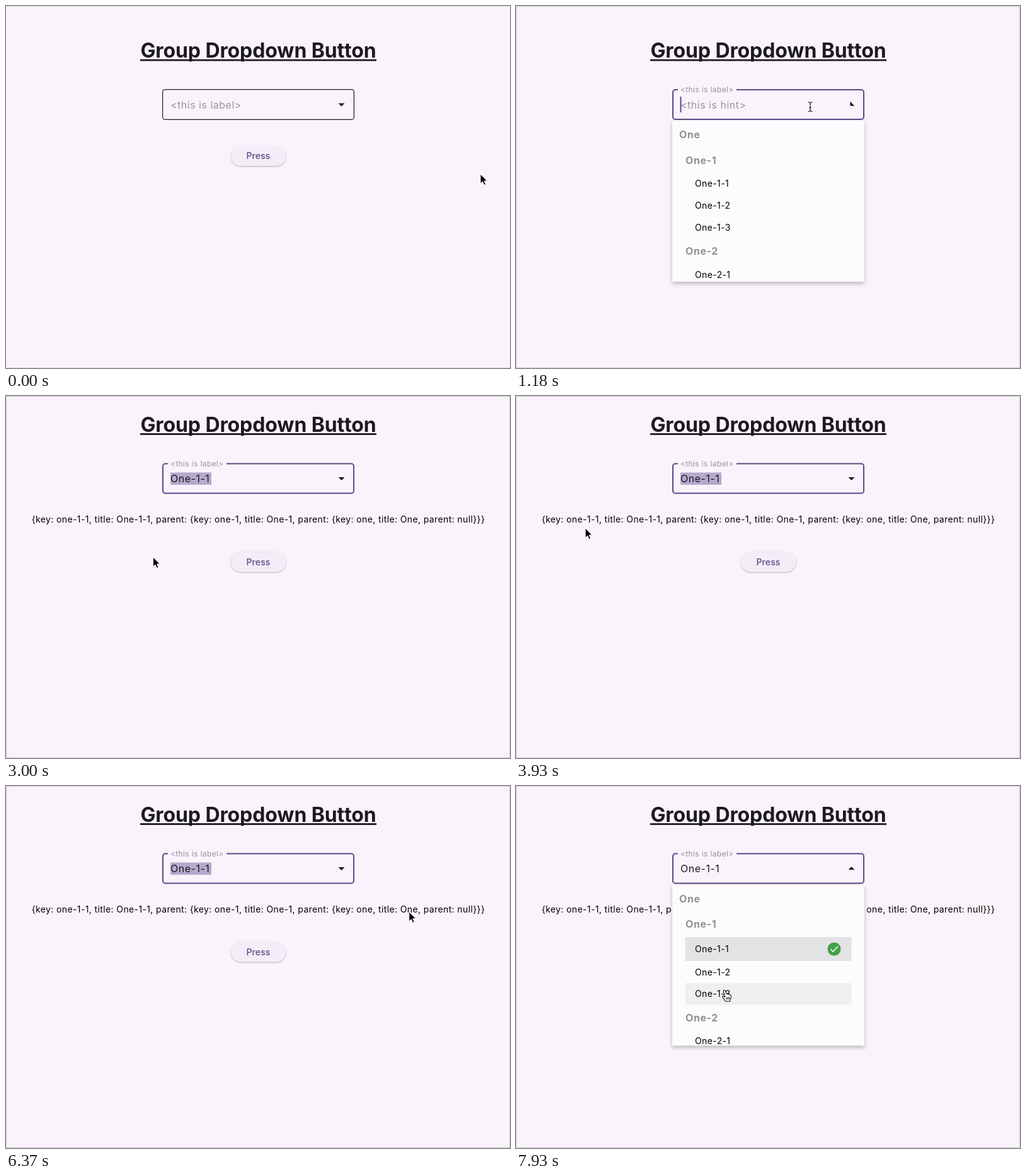
Animation, 800 px wide and 575 px high, one loop 8000 ms. Source, as an HTML page:

```html
<!DOCTYPE html>
<html lang="en">
<head>
<meta charset="utf-8">
<title>Group Dropdown Button</title>
<style>
  html, body { margin: 0; width: 100%; height: 100%; overflow: hidden; background: #faf3fb; }
  svg { display: block; width: 100vw; height: 100vh; }
  text { font-family: Inter, Roboto, sans-serif; white-space: pre; }
  .body { font-size: 16px; letter-spacing: .5px; }
  .small { font-size: 14px; letter-spacing: .38px; }
  .dim { fill: #97929a; }
  .group { font-size: 16px; font-weight: 700; letter-spacing: .6px; fill: #929194; }
  .title { font-size: 32px; font-weight: 700; letter-spacing: -.1px; fill: #1c1a1f; }
  .press { font-size: 14px; font-weight: 500; letter-spacing: .1px; fill: #5b4a86; }
  .button { fill: #f4edf8; filter: drop-shadow(0 1px 1px rgba(0, 0, 0, .28)); }
  .panel { fill: #fdfbfe; filter: drop-shadow(0 3px 3px rgba(0, 0, 0, .26)); }
</style>
</head>
<body>
<svg viewBox="0 0 800 575">
  <defs>
    <clipPath id="panelClip"><rect x="248" y="183" width="305" height="255"/></clipPath>
    <clipPath id="rowClip"><rect x="268.5" y="265" width="264" height="34.5"/></clipPath>
  </defs>
  <rect width="800" height="575" fill="#faf3fb"/>
  <path id="edgeIdle" d="M0 .5H800M0 574.5H800" stroke="#e0dae1"/>
  <rect id="edgeActive" x=".5" y=".5" width="799" height="574" fill="none" stroke="#cec9cf"/>

  <g id="head">
    <text class="title" x="400.5" y="82" text-anchor="middle">Group Dropdown Button</text>
    <rect x="213" y="84.6" width="375" height="2.8" fill="#1c1a1f"/>
    <rect id="idleBorder" x="248.6" y="132.6" width="303.8" height="47.8" rx="4" fill="none" stroke="#1c1a1f" stroke-width="1.2"/>
    <path id="focusBorder" fill="none" stroke="#5b4a86" stroke-width="2"
      d="M257 133H253a4 4 0 0 0-4 4V176a4 4 0 0 0 4 4H548a4 4 0 0 0 4-4V137a4 4 0 0 0-4-4H350"/>
    <text id="label" class="body dim">&lt;this is label&gt;</text>
    <text id="hint" class="body dim" x="261" y="162.5">&lt;this is hint&gt;</text>
    <rect id="selection" x="261" y="147" width="65" height="19.5" fill="#b6a9cb"/>
    <text id="value" class="body" x="261" y="162.5" fill="#1c1a1f">One-1-1</text>
    <rect id="caret" y="144" width="2" height="25" fill="#5b4a86"/>
    <path id="arrow" d="M-5-2H5L0 3Z" fill="#1c1a1f"/>
  </g>

  <text id="details" class="small" x="400.5" y="201" text-anchor="middle">{key: one-1-1, title: One-1-1, parent: {key: one-1, title: One-1, parent: {key: one, title: One, parent: null}}}</text>

  <g id="press">
    <rect class="button" x="357" y="222" width="87.5" height="32" rx="16"/>
    <text class="press" x="400.5" y="243" text-anchor="middle">Press</text>
  </g>

  <g id="menu">
    <rect class="panel" x="248" y="183" width="305" height="255"/>
    <g id="rows" clip-path="url(#panelClip)"></g>
    <g clip-path="url(#rowClip)"><circle id="ripple" cx="373" cy="282" fill="rgba(0,0,0,.1)"/></g>
    <g id="check" transform="translate(505 284.5)">
      <circle r="10.5" fill="#43a047"/>
      <path d="M-5.5.3L-1.8 4L6-4.2" fill="none" stroke="#fff" stroke-width="1.6"/>
    </g>
  </g>

  <g id="pointer">
    <path id="arrowShape" d="M0 0V15.2L3.5 11.9L5.9 17.4L8.5 16.3L6.1 10.9H10.8Z" fill="#000" stroke="#fff" stroke-width="1"/>
    <g id="beamShape" fill="none">
      <path d="M-3.5-7.5Q0-7.5 0-5Q0-7.5 3.5-7.5M0-5.5V5.5M-3.5 7.5Q0 7.5 0 5Q0 7.5 3.5 7.5M-1.8 1.5H1.8" stroke="#fff" stroke-width="2.6"/>
      <path d="M-3.5-7.5Q0-7.5 0-5Q0-7.5 3.5-7.5M0-5.5V5.5M-3.5 7.5Q0 7.5 0 5Q0 7.5 3.5 7.5M-1.8 1.5H1.8" stroke="#111" stroke-width="1.2"/>
    </g>
    <g id="handShape" stroke="#111" stroke-width="1.1" stroke-linejoin="round">
      <path fill="#fff" d="M-1.6 1.5Q-2-.6-.2-.7Q1.2-.6 1.8 1.4L3 5.4Q4.6 4.4 5.8 5.8Q7.5 5.2 8.4 6.8Q10.2 6.7 10.4 9Q10.7 12 8.8 14.6L8.6 17H1.4Q.2 14.4-3 10.8Q-4 8.6-2 8.5L.8 10.4Z"/>
      <path fill="none" d="M3 10.5L3.5 14M5.2 10.3L5.6 14M7.4 10L7.6 13.7"/>
    </g>
  </g>
</svg>
<script>
const LOOP = 8000;
const FOCUS = 1000, OPEN = 1130, PRESS = 2270, PICK = 2490, REOPEN = 7240;
const SPIN = 200, SHIFT = 25.5;

// time, x, y of the pointer's hot spot
const PATH = [
  [120, 753, 267], [1000, 467, 160], [1300, 467, 160], [1950, 369, 282],
  [2500, 369, 282], [3310, 150, 240], [3560, 52, 212], [3930, 110, 210],
  [4180, 110, 210], [5060, 357, 203], [5810, 588, 202], [6120, 640, 200],
  [6370, 640, 200], [7100, 460, 134], [7280, 460, 134], [7850, 331, 325]
];

// text, x, centre before and after a choice is made
const ROWS = [
  ['One', 259, 204.5, 204.5], ['One-1', 269, 245, 245],
  ['One-1-1', 284, 282.3, 284.5], ['One-1-2', 284, 317, 321.3],
  ['One-1-3', 284, 351.5, 355.6], ['One-2', 269, 389.5, 393.6],
  ['One-2-1', 284, 426.5, 430.8]
];

const $ = id => document.getElementById(id);
const clamp = v => Math.min(1, Math.max(0, v));
const mix = (a, b, p) => a + (b - a) * p;
const show = (id, on) => { $(id).style.display = on ? '' : 'none'; };
const move = (id, x, y, extra = '') => $(id).setAttribute('transform', `translate(${x} ${y}) ${extra}`);

function add(parent, tag, attrs, text = '') {
  const el = document.createElementNS(parent.namespaceURI, tag);
  for (const key in attrs) el.setAttribute(key, attrs[key]);
  el.textContent = text;
  return parent.appendChild(el);
}

const rows = ROWS.map(([text, x, before, after]) => {
  const item = x === 284;
  const g = add($('rows'), 'g', {});
  const back = add(g, 'rect', { x: 268.5, width: 264 });
  add(g, 'text', { class: item ? 'small' : 'group', x, y: item ? 5 : 5.8 }, text);
  return { g, back, item, before, after, chosen: text === 'One-1-1' };
});

function pointerAt(t) {
  const next = PATH.findIndex(k => k[0] > t);
  if (next === 0) return PATH[0].slice(1);
  if (next < 0) return PATH[PATH.length - 1].slice(1);
  const [t0, x0, y0] = PATH[next - 1], [t1, x1, y1] = PATH[next];
  const p = (t - t0) / (t1 - t0);
  return [mix(x0, x1, p), mix(y0, y1, p)];
}

function draw(t) {
  const focused = t >= FOCUS, picked = t >= PICK, reopened = t >= REOPEN;
  const open = (t >= OPEN && !picked) || reopened;
  const shift = picked ? SHIFT : 0;
  const [px, py] = pointerAt(t);
  const localY = py + shift;

  show('edgeIdle', !focused);
  show('edgeActive', focused);
  move('head', 0, -shift);
  move('menu', 0, -shift);
  move('press', 0, shift);
  show('details', picked);
  show('menu', open);

  const float = clamp((t - FOCUS) / 167);
  move('label', 261, mix(162.5, 137.3, float), `scale(${mix(1, .75, float)})`);
  show('idleBorder', !focused);
  show('focusBorder', focused);
  show('hint', focused && !picked);
  $('hint').style.opacity = float;
  show('value', picked);
  show('selection', picked && !reopened);

  const since = t - (reopened ? REOPEN : FOCUS);
  show('caret', focused && (!picked || reopened) && since % 1000 < 500);
  $('caret').setAttribute('x', reopened ? 326 : 260.5);

  const turn = clamp((t - OPEN) / SPIN) - clamp((t - PICK) / SPIN) + clamp((t - REOPEN) / SPIN);
  move('arrow', 532.5, 156.5, `rotate(${turn * 180})`);

  let overItem = false;
  for (const { g, back, item, before, after, chosen } of rows) {
    const centre = picked ? after : before;
    const marked = chosen && picked;
    const half = marked ? 19 : 17.2;
    const hover = open && item && px > 268 && px < 532 && Math.abs(localY - centre) < half;
    const pressed = chosen && !picked && t >= PRESS;
    overItem = overItem || hover;
    g.setAttribute('transform', `translate(0 ${centre})`);
    back.setAttribute('y', -half);
    back.setAttribute('height', half * 2);
    back.setAttribute('fill-opacity', marked || pressed ? .1 : hover ? .05 : 0);
  }
  show('check', picked);
  show('ripple', t >= PRESS && !picked);
  $('ripple').setAttribute('r', Math.max(0, (t - PRESS) / 2));

  const overField = px > 248 && px < 553 && localY > 132 && localY < 181;
  const overButton = !open && Math.abs(px - 400.5) < 44 && Math.abs(py - 238 - shift) < 16;
  const hand = overItem || overButton;
  move('pointer', px, py);
  show('handShape', hand);
  show('beamShape', overField && !hand);
  show('arrowShape', !overField && !hand);
}

const start = performance.now();
function tick() {
  draw((performance.now() - start) % LOOP);
  requestAnimationFrame(tick);
}
tick();
</script>
</body>
</html>
```
